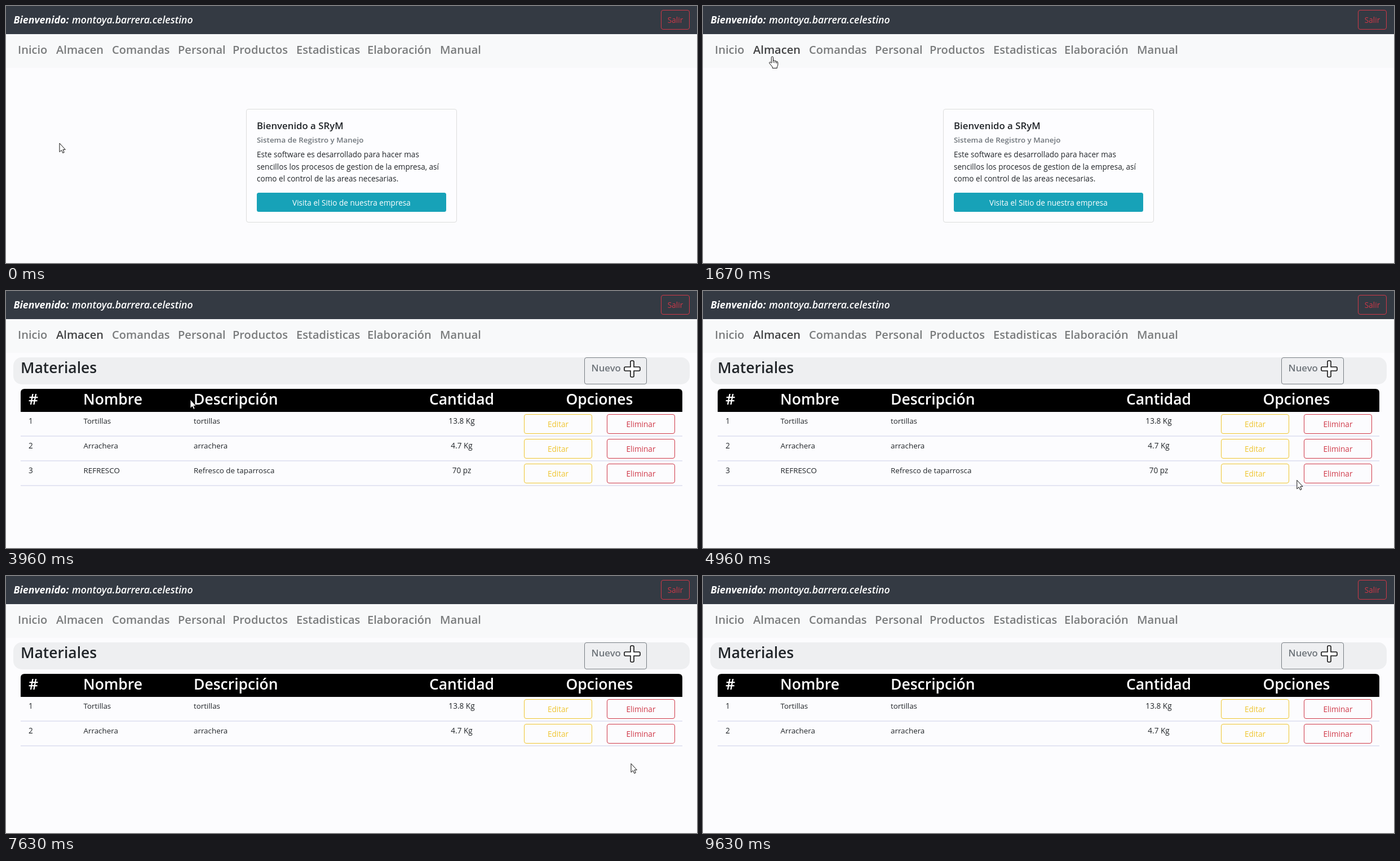
Write an HTML page that moves like this. It is 1226 px wide and 457 px high and loops after 9680 ms.

```html
<!DOCTYPE html>
<html lang="es">
<head>
<meta charset="utf-8">
<title>Materiales</title>
<style>
  html, body { margin: 0; width: 100%; height: 100%; overflow: hidden; background: #fcfcfe; }
  svg { display: block; width: 100%; height: 100%; font-family: "Open Sans", "Noto Sans", sans-serif; cursor: default; }
  text { font-size: 13.6px; fill: #212529; white-space: pre; }
  .mid { text-anchor: middle; }
  .semi { font-weight: 600; }
  .small { font-size: 13.4px; }
  .lead { font-size: 16.8px; }
  .head { font-size: 26.5px; font-weight: 600; }
  .user { font-size: 17.8px; fill: #fff; font-style: italic; }
  .white { fill: #fff; }
  .muted { fill: #6f757b; }
  .link { font-size: 20.1px; font-weight: 600; fill: #7a7c7d; }
  .link.on { fill: #424344; }
  .btn rect { fill: none; stroke: var(--c); }
  .btn text { fill: var(--c); text-anchor: middle; }
  .btn.on rect { fill: var(--c); }
  .btn.on text { fill: var(--on); }
  .red { --c: #cf3848; --on: #fff; }
  .red.on { --c: #dc3545; }
  .gold { --c: #efc52f; --on: #212529; }
</style>
</head>
<body>
<svg id="stage" viewBox="0 0 1226 457" preserveAspectRatio="none"></svg>
<script>
const LOOP = 9680;
const CARD_OUT = 1880, ROWS_IN = 2080, CLICK = 6300, ROW_OUT = 6560, GONE = 8900;

const text = (x, y, s, cls = '') => `<text x="${x}" y="${y}" class="${cls}">${s}</text>`;
const rect = (x, y, w, h, fill, r = 0, more = '') =>
  `<rect x="${x}" y="${y}" width="${w}" height="${h}" rx="${r}" fill="${fill}" ${more}/>`;
const button = (id, x, y, w, label, cls) =>
  `<g id="${id}" class="btn ${cls}">${rect(x + .5, y + .5, w - 1, 34, 'none', 3.5)}${text(x + w / 2, y + 22.5, label, 'mid')}</g>`;

const links = [['Inicio', 21], ['Almacen', 89], ['Comandas', 188], ['Personal', 305],
  ['Productos', 402], ['Estadisticas', 515], ['Elaboración', 641], ['Manual', 770]];

const rows = [
  ['Tortillas', 'tortillas', '13.8 Kg'],
  ['Arrachera', 'arrachera', '4.7 Kg'],
  ['REFRESCO', 'Refresco de taparrosca', '70 pz']
];
const rowTop = i => 219 + 44 * i;

const row = ([name, about, amount], i) => {
  const y = rowTop(i), base = y + 17;
  return `<g id="row${i}">` +
    text(40, base, i + 1) + text(137.5, base, name, 'small') + text(333, base, about, 'small') +
    text(808.5, base, amount, 'mid') +
    button('edit' + i, 919, y, 121, 'Editar', 'gold') +
    button('drop' + i, 1066, y, 121, 'Eliminar', 'red') +
    rect(26, y + 38, 1174, 2, '#e4e5f3') + '</g>';
};

const card = `<g id="card">
  ${rect(426.5, 183.5, 373, 201, '#fdfdff', 3.5, 'stroke="#dcdddc"')}
  ${text(445, 219, 'Bienvenido a SRyM', 'lead semi')}
  ${text(445, 242.5, 'Sistema de Registro y Manejo', 'small semi muted')}
  ${['Este software es desarrollado para hacer mas',
     'sencillos los procesos de gestion de la empresa, así',
     'como el control de las areas necesarias.'].map((s, i) => text(445, 269 + i * 21.6, s)).join('')}
  ${rect(445, 332, 336, 34, '#17a2b8', 3.5)}
  ${text(613, 354.5, 'Visita el Sitio de nuestra empresa', 'mid white')}
</g>`;

const panel = `<g id="panel">
  ${rect(13, 118, 1200, 48, '#eeeff1', 15)}
  ${text(26, 146, 'Materiales', 'head')}
  ${rect(1026.5, 118.5, 110, 47, 'none', 3.5, 'stroke="#777d83"')}
  ${text(1038.5, 143, 'Nuevo', 'lead semi muted')}
  <path d="M1108 126q0-2 2-2h2q2 0 2 2v9h9q2 0 2 2v3q0 2-2 2h-9v9q0 2-2 2h-2q-2 0-2-2v-9h-9q-2 0-2-2v-3q0-2 2-2h9z"
    fill="#fff" stroke="#111" stroke-width="1.6"/>
  <path d="M26 215V181q0-7 7-7H1193q7 0 7 7V215z" fill="#000"/>
  ${text(40, 202, '#', 'head white')}
  ${text(137, 202, 'Nombre', 'head white')}
  ${text(333, 202, 'Descripción', 'head white')}
  ${text(808.5, 202, 'Cantidad', 'head white mid')}
  ${text(1053, 202, 'Opciones', 'head white mid')}
  <g id="rows">${rows.map(row).join('')}</g>
</g>`;

const pointers = `<g id="pointer" stroke="#111" fill="#fff" stroke-linejoin="round">
  <path id="arrow" d="M0 0V15.5L3.5 12.3 5.8 17.4 8.2 16.3 6 11.3H10.3z"/>
  <path id="hand" d="M-1.7 1.6q0-1.6 1.6-1.6t1.6 1.6V7q2.6-1 3.2.8 2.3-.6 2.8 1 2.3-.3 2.3 2V14.5q0 2-1.4 3.6V20.5H.2V18.3L-4.9 12.1q-1-1.5.2-2.2 1.3-.6 2.2.6l.8 1z M1.5 7v4 M4.7 8v3.4 M7.5 9v3"/>
</g>`;

document.getElementById('stage').innerHTML =
  rect(0, 0, 1226, 457, '#fcfcfe') +
  rect(0, 0, 1226, 50, '#343a43') +
  rect(0, 50, 1226, 60, '#f8f9fa') +
  `<g font-weight="700">${text(13.5, 31, 'Bienvenido:', 'user')}</g>` +
  text(117, 31, 'montoya.barrera.celestino', 'user semi') +
  button('exit', 1162, 7, 51, 'Salir', 'red') +
  links.map(([s, x]) => `<g id="${s}">${text(x, 85, s, 'link')}</g>`).join('') +
  card + panel + pointers;

// Pointer stops: time, x, y
const path = [
  [0, 95, 244], [480, 95, 244], [1000, 112, 170], [1420, 123, 90], [3050, 123, 90],
  [3500, 215, 311], [3960, 327, 193], [4500, 700, 300], [5000, 1060, 337],
  [5450, 1112, 338], [5800, 1109, 334.5], [8150, 1109, 333.5], [GONE, 1040, 462]
];

function pointerAt(t) {
  const k = path.findIndex(p => p[0] > t);
  if (k < 0) return path[path.length - 1].slice(1);
  const [t0, x0, y0] = path[k - 1], [t1, x1, y1] = path[k];
  const u = (t - t0) / (t1 - t0), e = u * u * (3 - 2 * u);
  return [x0 + (x1 - x0) * e, y0 + (y1 - y0) * e];
}

const el = id => document.getElementById(id);
const show = (id, on) => { el(id).style.display = on ? '' : 'none'; };
const light = (node, on) => node.classList.toggle('on', on);
const almacen = el('Almacen').firstChild;

function draw(t) {
  const [x, y] = pointerAt(t);
  const inside = (x0, y0, w, h) => x >= x0 && x < x0 + w && y >= y0 && y < y0 + h;

  show('card', t < CARD_OUT);
  show('panel', t >= CARD_OUT);
  show('rows', t >= ROWS_IN);
  show('row2', t < ROW_OUT);

  const onLink = inside(88, 60, 86, 40);
  light(almacen, onLink || (t >= 1700 && t < CLICK));

  let hot = onLink;
  rows.forEach((_, i) => {
    const live = t >= ROWS_IN && (i < 2 || t < ROW_OUT);
    for (const [id, left] of [['edit', 919], ['drop', 1066]]) {
      const over = live && inside(left, rowTop(i), 121, 35);
      light(el(id + i), over);
      hot = hot || over;
    }
  });

  show('pointer', t < GONE);
  show('arrow', !hot);
  show('hand', hot);
  el('pointer').setAttribute('transform', `translate(${x.toFixed(1)} ${y.toFixed(1)})`);
}

const start = performance.now();
function tick() {
  draw((performance.now() - start) % LOOP);
  requestAnimationFrame(tick);
}
tick();
</script>
</body>
</html>
```
